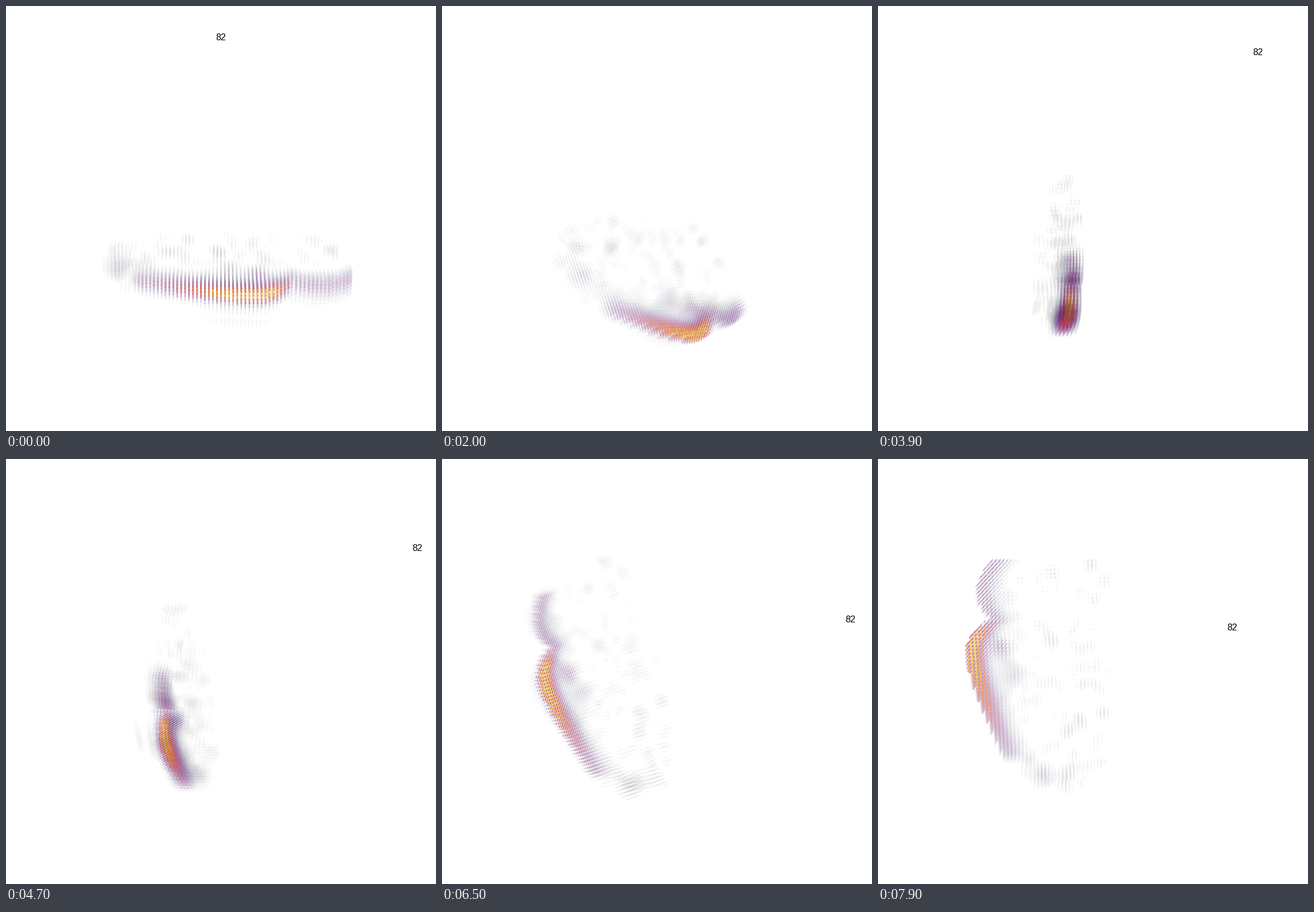
Recreate the animation shown at these times as a matplotlib script. Size 753 by 744 pixels, loop 8 s.

```python
import numpy as np
import matplotlib.pyplot as plt
from matplotlib.animation import FuncAnimation

W, H, DPI = 753, 744, 64
PT = 72 / DPI                    # points per pixel
FRAMES, STEP = 80, 100
HALF, EYE = 207, 1388            # half side of the box, eye distance (px)
TILT = np.radians(20)
LABEL = np.array([[0, 280, 277]])
NOTCH = 108                      # gap between the two lobes

rng = np.random.default_rng(82)


def bell(d, s):
    return np.exp(-(d / s) ** 2)


def ramp(x, a, b):
    t = np.clip((x - a) / (b - a), 0, 1)
    return t * t * (3 - 2 * t)


def top(x):
    """Upper outline: a long skewed lobe, then a short round one."""
    long = -206 + 0.36 * (np.hypot(x - 50, 60) - 60) + 0.012 * np.maximum(x - 60, 0) ** 2
    short = -182 + 0.01 * (x - 155) ** 2
    return np.where(x > NOTCH, short, long)


def low(x):
    return 28 - 0.0025 * np.maximum(-60 - x, 0) ** 2


def blobs():
    """Yield x, y, z, strength and size of the faint clumps."""
    yield -174, -94, -50, 0.13, 22
    yield 58, -152, -42, 0.25, 17
    yield 10, -136, -48, 0.15, 20
    yield 75, -67, -50, 0.14, 13
    yield -60, 16, -46, 0.14, 12
    for _ in range(110):
        x = rng.uniform(-200, 205)
        y = rng.uniform(top(x) + 25, low(x))
        yield x, y, rng.uniform(-85, -31), rng.uniform(0.05, 0.09), rng.uniform(6, 14)


def make_cloud():
    step = 2 * HALF / 66
    x, y, z = (-HALF + step * g.ravel().astype(float) for g in np.mgrid[0:67, 0:41, 12:29])
    depth = y - top(x) - 0.003 * (z + 45) ** 2

    front = ramp(x, -150, -128) * (x < NOTCH)
    power = front * (0.32 + 0.73 * ramp(x, -150, 60)) * (1 - 0.5 * ramp(x, 80, NOTCH))
    v = power * bell(depth - 8, 19) * bell(z + 53, 15.5)
    v += 0.07 * front * bell(depth - 28, 22) * bell(z + 45, 18)
    back = x > NOTCH
    v += back * (0.32 * bell(depth - 6, 18) * bell(z + 48, 16)
                 + 0.07 * bell(depth - 18, 28) * bell(z + 62, 28))
    rim = bell(z + 88, 6) + bell(z + 111, 7)
    v += 0.07 * bell(x - 25, 65) * bell(depth - 12, 16) * rim
    for bx, by, bz, strength, size in blobs():
        v += strength * bell(np.sqrt((x - bx) ** 2 + (y - by) ** 2 + (z - bz) ** 2), size)

    v *= rng.uniform(0.88, 1.08, v.size)
    keep = (v > 0.03) & (depth > -4) & (y < low(x) + 8)
    v = np.clip(v[keep], 0, 1)
    rgba = plt.get_cmap("inferno")(0.94 * v)
    rgba[:, 3] = 0.88 * v ** 1.15
    return np.column_stack([x, y, z])[keep], rgba


def view(angle):
    """Spin about the (1, 1, 1) diagonal, then tilt towards the viewer."""
    c, s = np.cos(angle), np.sin(angle) / np.sqrt(3)
    a, b, d = (1 + 2 * c) / 3, (1 - c) / 3 + s, (1 - c) / 3 - s
    spin = np.array([[a, d, b], [b, a, d], [d, b, a]])
    st, ct = np.sin(TILT), np.cos(TILT)
    return np.array([[1, 0, 0], [0, st, ct], [0, -ct, st]]) @ spin


def project(points, m):
    p = points @ m.T
    k = 1 / (1 - p[:, 2] / EYE)
    return np.column_stack([W / 2 + p[:, 0] * k, H / 2 - p[:, 1] * k]), p[:, 2]


cloud, colors = make_cloud()

fig = plt.figure(figsize=(W / DPI, H / DPI), dpi=DPI, facecolor="white")
ax = fig.add_axes([0, 0, 1, 1])
ax.set(xlim=(0, W), ylim=(H, 0))
ax.axis("off")
dots = ax.scatter(cloud[:, 0], cloud[:, 1], s=(3.2 * PT) ** 2, linewidths=0)
label = ax.text(0, 0, "82", family="Liberation Sans", size=16 * PT, color="black",
                ha="center", va="baseline")


def draw(n):
    m = view(np.radians(3 * n))
    xy, depth = project(cloud, m)
    order = np.argsort(depth)
    dots.set_offsets(xy[order])
    dots.set_facecolors(colors[order])
    (tx, ty), = project(LABEL, m)[0]
    label.set_position((tx - 0.7, ty + 6))
    return dots, label


anim = FuncAnimation(fig, draw, frames=FRAMES, interval=STEP, repeat=True, repeat_delay=0)
plt.show()
```
